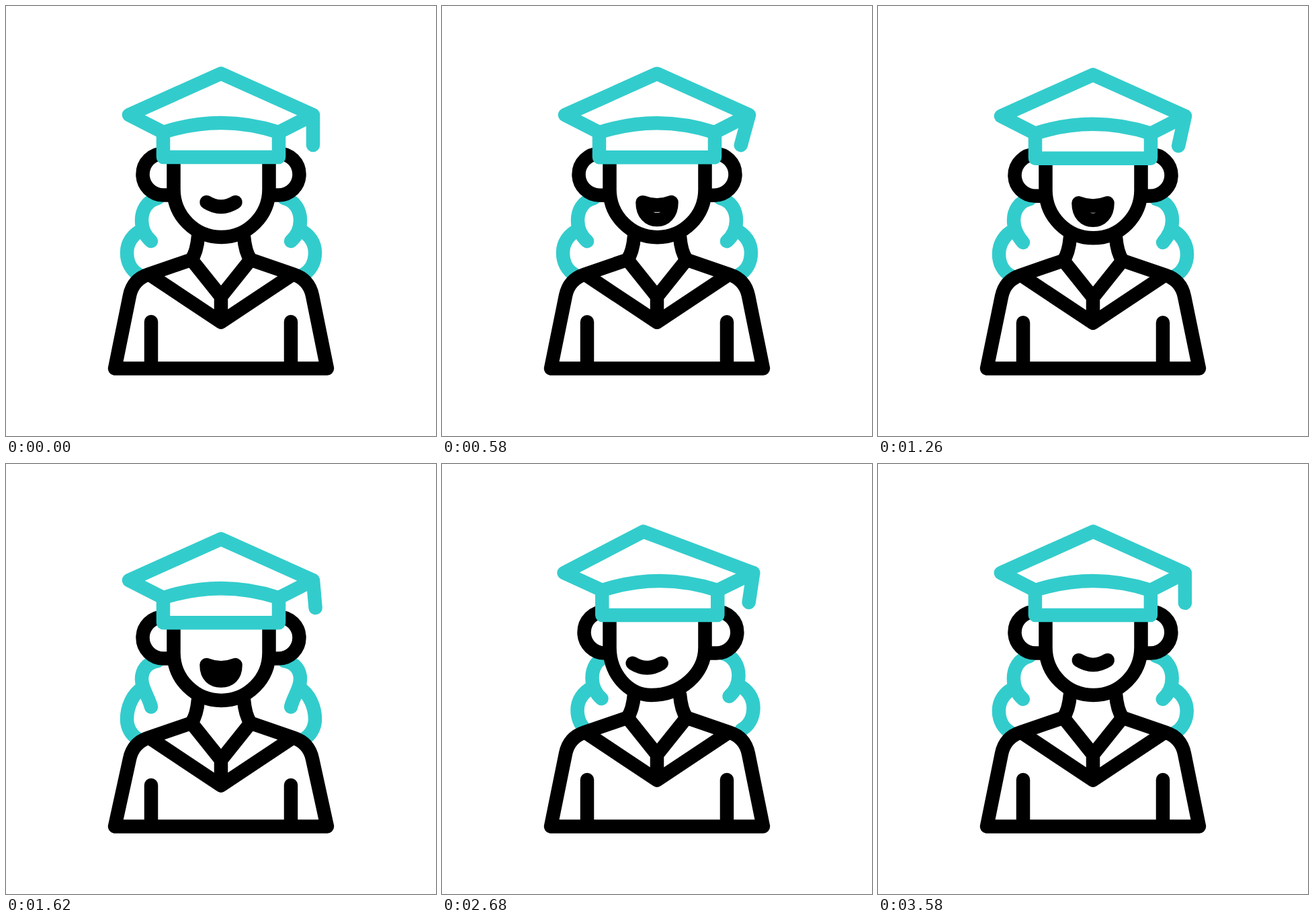
Write an HTML page that moves like this. It is 640x640 px and loops after 3600 ms.

```html
<!DOCTYPE html>
<html lang="en">
<head>
<meta charset="utf-8">
<title>Graduate</title>
<style>
  html, body { margin: 0; width: 100%; height: 100%; overflow: hidden; background: #fff; }
  svg { display: block; width: 100vw; height: 100vh; }
  path { fill: none; stroke: #000; stroke-width: 20.5; stroke-linecap: round; stroke-linejoin: round; }
  .teal { stroke: #3cc; }
  .solid { fill: #fff; }
  .butt { stroke-linecap: butt; }
</style>
</head>
<body>
<svg viewBox="0 0 640 640">
  <path id="hairL" class="teal"/>
  <path id="hairR" class="teal"/>
  <path id="body" class="solid"/>
  <path id="gown"/>
  <path id="ears" class="butt"/>
  <path id="face" class="solid butt"/>
  <path id="mouth"/>
  <path id="band" class="teal solid"/>
  <path id="board" class="teal"/>
</svg>
<script>
const LOOP = 3600;

// Eased value from [time, value, time, value, ...]
function key(t, k) {
  let i = 0;
  while (i < k.length - 4 && t >= k[i + 2]) i += 2;
  const p = Math.min(1, Math.max(0, (t - k[i]) / (k[i + 2] - k[i])));
  return k[i + 1] + (k[i + 3] - k[i + 1]) * p * p * (3 - 2 * p);
}

const BOB = [0, 0, 300, 1, 600, 0, 900, 1, 1200, 0, 1500, 1, 1800, 0];
const RIGHT = [1800, 0, 2300, 1, 2800, 0, 3300, 1, 3600, 0];
const LEFT = [2300, 0, 2800, 1, 3300, 0];
const OPEN = [0, 0, 300, 1, 1800, 1, 2100, 0];
const SWING = [0, 0, 300, 12.5, 600, -12.5, 900, 12.5, 1200, -12.5, 1500, 12.5,
  1800, -12.5, 2300, 10.5, 2800, -9.5, 3300, 10.5, 3600, 0];

const set = (id, d) => document.getElementById(id).setAttribute('d', d);

// Side 1 is left, -1 is its mirror
function hair(side, dx, dy, bob) {
  const p = (x, y, bx, by) =>
    `${320 + side * (x + bx * bob - 320) + dx} ${y + by * bob + dy} `;
  return 'M' + p(226, 286, 0, 11) +
    'C' + p(209, 290, 0, 9) + p(202, 305, 0, 4) + p(202, 319, 0, 2) +
    'C' + p(202, 333, 0, 2) + p(208, 343, 7, 6) + p(216, 350, 0, 18) +
    'M' + p(203, 333, 0, 1) +
    'C' + p(188, 340, 2, 2) + p(180, 353, 0, 12) + p(180, 367, 0, 20) +
    'C' + p(180, 382, 0, 17) + p(187, 394, 0, 15) + p(198, 400, -3, 14);
}

function draw(t) {
  const bob = key(t, BOB), a = key(t, RIGHT), b = key(t, LEFT), open = key(t, OPEN);
  const turn = (r, l) => a * r + b * l;
  const d = 12.4 * bob;   // drop of head and shoulders
  const c = 17.3 * bob;   // drop of cap

  set('hairL', hair(1, turn(-8.5, 26.5), turn(-5, 0), bob));
  set('hairR', hair(-1, turn(-26.5, 8.5), turn(0, -5), bob));

  set('body', `M286 ${343 + d}Q284 ${366 + d} 276 ${377.5 + d}L212 ${399.5 + d}
    Q189 ${407 + d} 184 ${431 + d}L162 539.5H478L456 ${431 + d}
    Q451 ${407 + d} 428 ${399.5 + d}L364 ${377.5 + d}Q356 ${366 + d} 354 ${343 + d}`);
  set('gown', `M276 ${377.5 + d}L320 ${432.5 + d}L364 ${377.5 + d}
    M214 ${400 + d}L320 ${470.5 + d}L426 ${400 + d}M320 ${432.5 + d}V${470.5 + d}
    M216 ${470 + d}V536M424 ${470 + d}V536`);

  const el = turn(-4, 10), er = turn(-10, 5), top = 219.5 + d, low = 281.5 + d;
  set('ears', `M${240 + el} ${top}H${234.5 + el}A31 31 0 0 0 ${234.5 + el} ${low}H250
    M${400 + er} ${top}H${405.5 + er}A31 31 0 0 1 ${405.5 + er} ${low}H390`);

  const x = 320.5 + turn(13, -13), kl = (x - 249.5) * .552, kr = (391.5 - x) * .552;
  set('face', `M249.5 ${225 + d}V${273 + d}C249.5 ${312 + d} ${x - kl} ${344 + d} ${x} ${344 + d}
    C${x + kr} ${344 + d} 391.5 ${312 + d} 391.5 ${273 + d}V${225 + d}`);

  const m = 320 + turn(22, -21), my = 292 + turn(4.5, 4.5) + 11 * bob;
  const lip = my + 13.5 - 5 * open;
  const mid = my + 6.7 + (19.3 - 4 * bob) * open;
  const cy = my + 4.5 + 12.5 * open;
  set('mouth', `M${m - 21.5} ${my}Q${m} ${lip} ${m + 21.5} ${my}
    C${m + 21.5 - 7 * (1 - open)} ${cy} ${m + 12 - 5 * (1 - open)} ${mid} ${m} ${mid}
    C${m - 12 + 5 * (1 - open)} ${mid} ${m - 21.5 + 7 * (1 - open)} ${cy} ${m - 21.5} ${my}Z`);

  const s = turn(-9, 6.5), brim = 188 + c;
  const tipL = 183 + turn(-10, 0), tipR = 457 + turn(-16, 10);
  set('band', `M${234 + s} ${brim}Q${320 + s} ${160 + c} ${406 + s} ${brim}
    V${225 + c}H${234 + s}Z`);
  set('board', `M${234 + s} ${brim}L${tipL} ${162 + c}L${320 + turn(26, -28)} ${100.5 + c}
    L${tipR} ${162 + c}L${406 + s} ${brim}
    M${tipR} ${162 + c}L${tipR + key(t, SWING)} ${207 + 11 * bob - a - b}`);
}

function tick() {
  draw(performance.now() % LOOP);
  requestAnimationFrame(tick);
}
draw(0);
tick();
</script>
</body>
</html>
```
